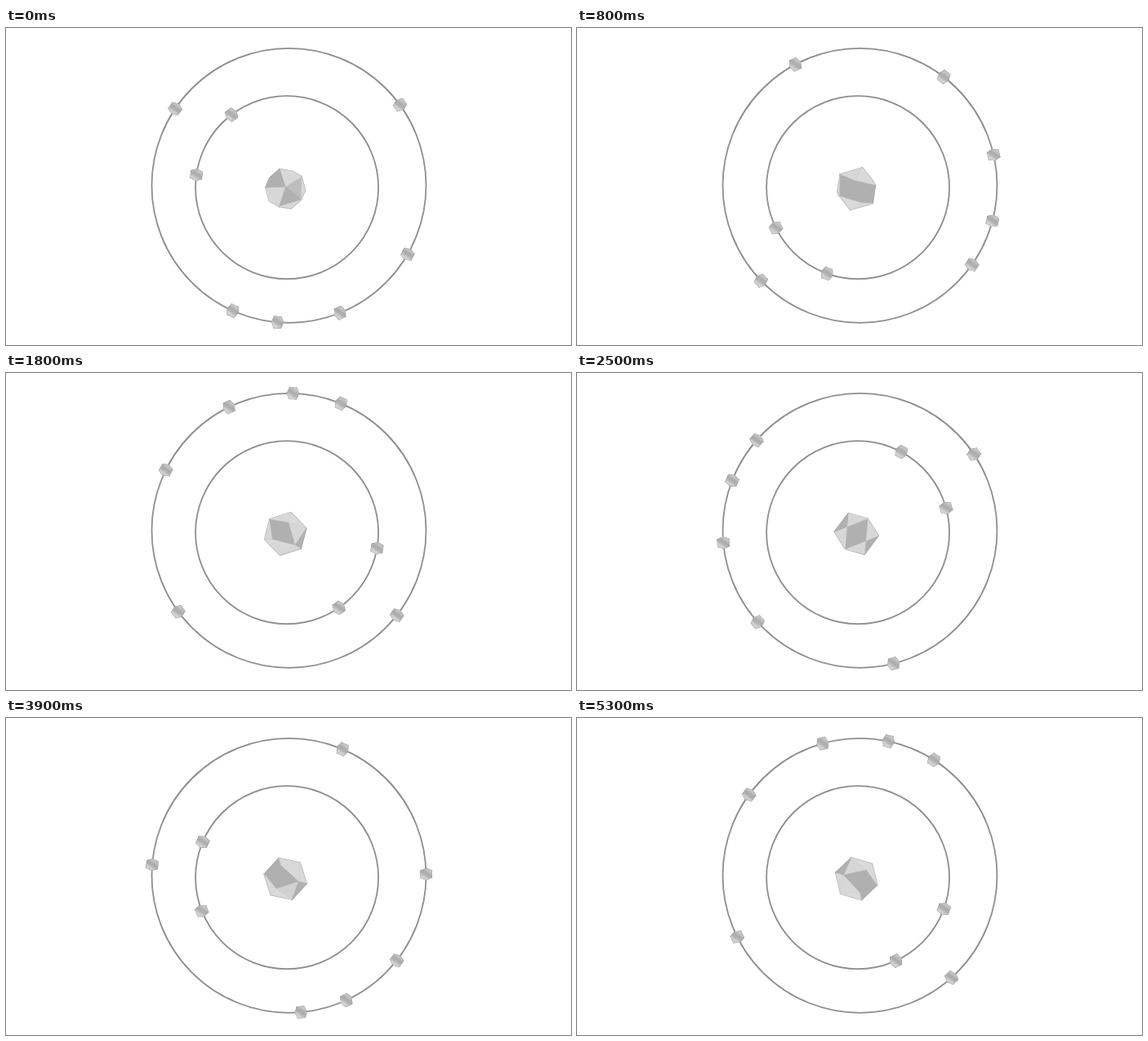
These frames come from a looping animation (692 px wide and 388 px high, 5400 ms). An HTML page with a canvas:

```html
<!DOCTYPE html>
<html lang="en">
<head>
<meta charset="utf-8">
<title>Atom</title>
<style>
html, body { margin: 0; width: 100%; height: 100%; overflow: hidden; background: #fff; }
canvas { display: block; }
</style>
</head>
<body>
<canvas id="stage" width="692" height="388"></canvas>
<script>
const ctx = document.getElementById('stage').getContext('2d');
const LOOP = 5400, STEP = 100;
const ORBIT_SPEED = 100, NUCLEUS_SPIN = 128; // degrees per second
const rad = deg => deg * Math.PI / 180;

// sway and peak: the orbits are seen slightly tilted, so the angle runs ahead or behind
const orbits = [
  { x: 346.5, y: 192.8, r: 168, sway: 2.1, peak: 130, electrons: [144, 36.1, 331.9, 293.9, 266.8, 246.8] },
  { x: 344.1, y: 195.2, r: 112, sway: 1.4, peak: 125, electrons: [126, 171.1] }
];

// time, then azimuth and radius of one vertex and of its neighbour, with the spin removed
const poses = [
  [0, 90, .09, 37, .894],
  [.8, -1, .37, 36, .985],
  [1.8, -28, .63, 24, .99],
  [2.5, 3, .526, 35, 1],
  [3.3, -32, .607, 28, .982],
  [4.5, -31, .607, 29, .982],
  [5.3, -35, .607, 25, .982]
];

const dot = (a, b) => a[0] * b[0] + a[1] * b[1] + a[2] * b[2];
const mix = (a, b, k) => a.map((v, i) => v + (b[i] - v) * k);
const addScaled = (a, b, k) => a.map((v, i) => v + b[i] * k);
const unit = a => a.map(v => v / Math.hypot(...a));
const cross = (a, b) => [a[1] * b[2] - a[2] * b[1], a[2] * b[0] - a[0] * b[2], a[0] * b[1] - a[1] * b[0]];
const onSphere = (az, r) => [r * Math.cos(rad(az)), -r * Math.sin(rad(az)), Math.sqrt(1 - r * r)];

function spin([x, y, z], deg) {
  const c = Math.cos(rad(deg)), s = Math.sin(rad(deg));
  return [x * c + y * s, y * c - x * s, z];
}

// Twelve unit vertices with one at a and a neighbour towards b
function icosahedron(a, b) {
  const axis = unit(a);
  const u = unit(addScaled(b, axis, -dot(b, axis)));
  const v = cross(axis, u);
  const half = [axis];
  for (let k = 0; k < 5; k++) {
    const q = rad(72 * k);
    half.push([0, 1, 2].map(i => .4472 * axis[i] + .8944 * (Math.cos(q) * u[i] + Math.sin(q) * v[i])));
  }
  return half.concat(half.map(p => p.map(n => -n)));
}

const faces = [];
const model = icosahedron([0, 0, 1], [1, 0, 0]);
const joined = (i, j) => dot(model[i], model[j]) > .4;
for (let i = 0; i < 12; i++)
  for (let j = i + 1; j < 12; j++)
    for (let k = j + 1; k < 12; k++)
      if (joined(i, j) && joined(j, k) && joined(i, k)) faces.push([i, j, k]);

// Lit from two opposite sides, leaving a dark band between them
function flatShade(n) {
  const lit = Math.abs(-.5 * n[0] + .75 * n[1]);
  const k = Math.min(1, Math.max(0, (lit - .32) / .07));
  const g = Math.round(176 + 38 * k * k * (3 - 2 * k) + 10 * Math.max(0, lit - .4));
  return `rgb(${g},${g},${g})`;
}

// The same light on a smooth solid
function smoothShade(x, y, size) {
  const dx = .5 * size, dy = .75 * size;
  const band = ctx.createLinearGradient(x + dx, y - dy, x - dx, y + dy);
  ['#cecece', '#c2c2c2', '#acacac', '#b4b4b4', '#d2d2d2', '#d6d6d6']
    .forEach((c, i) => band.addColorStop(i / 5, c));
  return () => band;
}

function drawSolid(x, y, size, [a, b], shade, edge) {
  const verts = icosahedron(a, b);
  const front = faces.map(f => {
    const pts = f.map(i => verts[i]);
    const normal = unit([0, 1, 2].map(i => pts[0][i] + pts[1][i] + pts[2][i]));
    const path = new Path2D();
    pts.forEach(p => path.lineTo(x + p[0] * size, y + p[1] * size));
    path.closePath();
    return { path, normal };
  }).filter(f => f.normal[2] > 0);
  ctx.lineJoin = 'round';
  ctx.lineWidth = 1.2;
  ctx.strokeStyle = edge;
  front.forEach(f => ctx.stroke(f.path));
  ctx.lineWidth = .4;
  front.forEach(f => {
    ctx.fillStyle = ctx.strokeStyle = shade(f.normal);
    ctx.fill(f.path);
    ctx.stroke(f.path);
  });
}

function nucleusPose(t) {
  let i = 0;
  while (i < poses.length - 2 && t >= poses[i + 1][0]) i++;
  const [p, q] = [poses[i], poses[i + 1]];
  const k = Math.min(1, (t - p[0]) / (q[0] - p[0]));
  return [1, 3].map(c => spin(mix(onSphere(p[c], p[c + 1]), onSphere(q[c], q[c + 1]), k), NUCLEUS_SPIN * t));
}

function draw(t) {
  ctx.fillStyle = '#fff';
  ctx.fillRect(0, 0, 692, 388);
  for (const o of orbits) {
    ctx.strokeStyle = '#8e8e8e';
    ctx.lineWidth = 1.8;
    ctx.beginPath();
    ctx.arc(o.x, o.y, o.r, 0, 2 * Math.PI);
    ctx.stroke();
  }
  for (const o of orbits)
    for (const start of o.electrons) {
      const turn = start + ORBIT_SPEED * t;
      const az = rad(turn + o.sway * Math.cos(rad(turn - o.peak)));
      const x = o.x + o.r * Math.cos(az), y = o.y - o.r * Math.sin(az);
      const pose = [onSphere(0, .526), onSphere(31.7, 1)].map(p => spin(p, turn));
      drawSolid(x, y, 8.1, pose, smoothShade(x, y, 8.1), '#8c8c8c');
    }
  drawSolid(342.2, 196.8, 27.2, nucleusPose(t), flatShade, '#9a9a9a');
}

function tick() {
  draw(Math.floor(performance.now() % LOOP / STEP) * STEP / 1000);
  requestAnimationFrame(tick);
}
tick();
</script>
</body>
</html>
```
